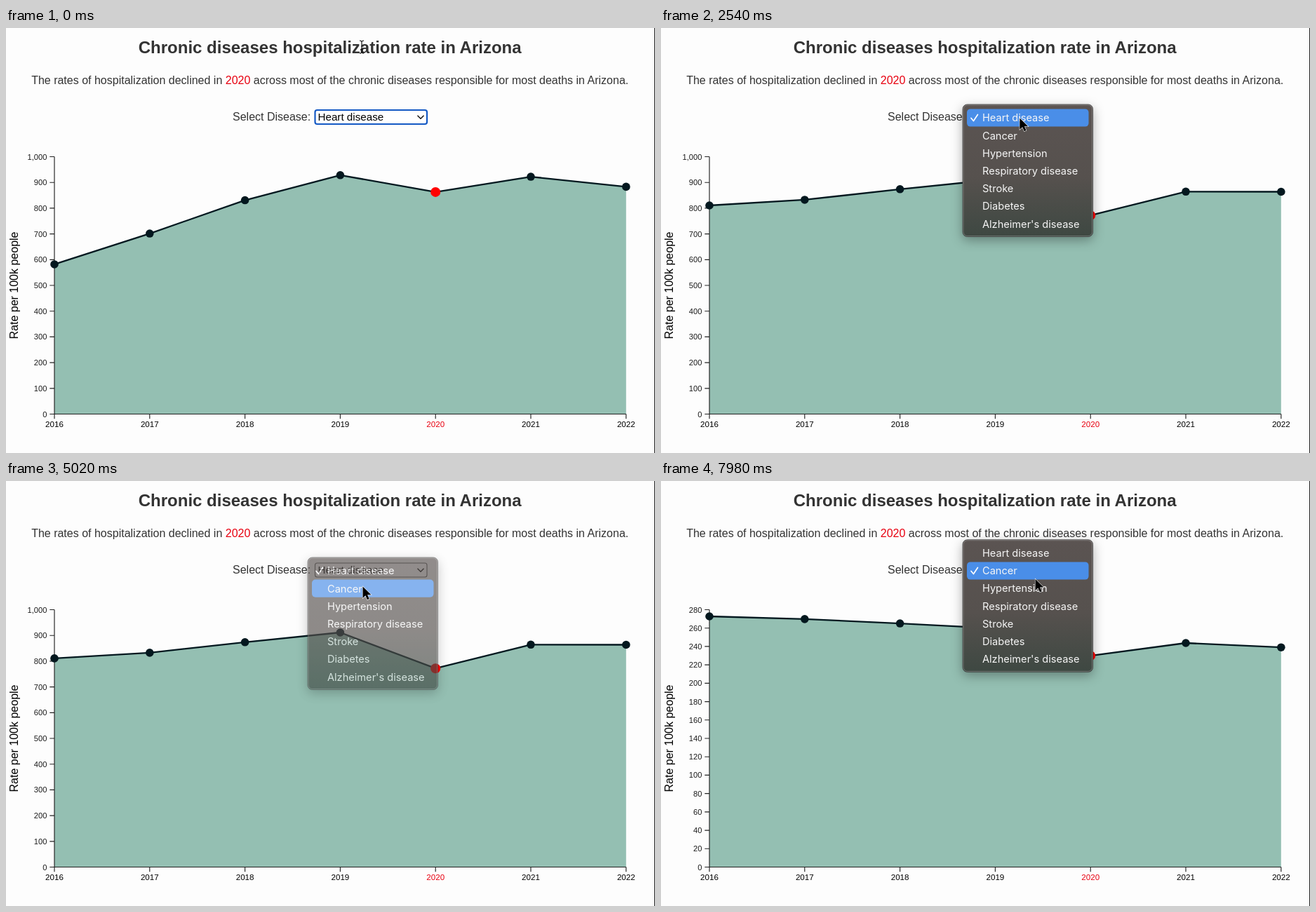
An HTML page that plays this animation: 925 by 606 pixels, repeating every 8000 ms.

```html
<!DOCTYPE html>
<html lang="en">
<head>
<meta charset="utf-8">
<title>Hospitalization rates</title>
<style>
  html, body { margin: 0; width: 100%; height: 100%; overflow: hidden; background: #fdfdfd; }
  svg { display: block; width: 100%; height: 100%; font: 16px "Liberation Sans", Arial, sans-serif; }
  .mid { text-anchor: middle; }
  .axis path { stroke: #222; stroke-width: 1.15; fill: none; }
  .ylab text { font-size: 11.2px; text-anchor: end; fill: #1c1c1c; }
  .xlab text { font-size: 11.6px; text-anchor: middle; }
  #menu { filter: drop-shadow(0 5px 8px rgba(0, 0, 0, .32)); }
  #menu text { font: 14.6px Inter, sans-serif; fill: #f6f6f6; }
</style>
</head>
<body>
<svg viewBox="0 0 925 606">
  <defs>
    <linearGradient id="glass" x2="0" y2="1">
      <stop offset="0" stop-color="#5b5452"/>
      <stop offset=".55" stop-color="#56514e"/>
      <stop offset="1" stop-color="#3e4842"/>
    </linearGradient>
  </defs>
  <rect width="925" height="606" fill="#fdfdfd"/>
  <path d="M924.5 0V606" stroke="#222"/>

  <text class="mid" x="461.7" y="36" font-size="24" font-weight="bold" fill="#333">Chronic diseases hospitalization rate in Arizona</text>
  <text class="mid" x="461.7" y="80" fill="#333">The rates of hospitalization declined in <tspan fill="#e80010">2020</tspan> across most of the chronic diseases responsible for most deaths in Arizona.</text>
  <text x="323" y="132" fill="#333">Select Disease:</text>

  <rect id="box" x="440.5" y="117" width="159.5" height="20" rx="3" fill="#fff"/>
  <text id="choice" x="444.5" y="132" font-size="15.2"></text>
  <path d="M586.5 124.7l4.5 4.6 4.5-4.6" fill="none" stroke="#111" stroke-width="1.4"/>

  <path id="area" fill="#94bfb2"/>
  <g class="axis"><path id="xAxis"/><path id="yAxis"/></g>
  <g id="yLabels" class="ylab"></g>
  <g id="xLabels" class="xlab"></g>
  <text class="mid" transform="translate(16.5 367) rotate(-90)">Rate per 100k people</text>
  <path id="line" fill="none" stroke="#04181f" stroke-width="2.3" stroke-linejoin="round"/>
  <g id="dots"></g>

  <g id="menu">
    <rect x="430" width="185.5" height="188.5" rx="6.5" fill="url(#glass)" stroke="#3a3a3a" stroke-width=".8"/>
    <rect x="430.9" y=".9" width="183.7" height="186.7" rx="5.8" fill="none" stroke="#fff" stroke-opacity=".25"/>
    <rect id="highlight" x="436" width="173.5" height="25.2" rx="5" fill="#4a8ee8"/>
    <g id="items"></g>
    <path id="check" d="M442 .5l3.4 4 6-9" fill="none" stroke="#fff" stroke-width="1.7" stroke-linecap="round" stroke-linejoin="round"/>
  </g>

  <path id="arrow" d="M0 0v16.4l3.8-3.6 2.7 6 2.7-1.2-2.6-5.8h5.3z" fill="#000" stroke="#fff" stroke-width="1.1" paint-order="stroke"/>
  <path id="ibeam" d="M-3-9q3 0 3 2.5V6.5Q0 9-3 9M3-9Q0-9 0-6.5M0 6.5Q0 9 3 9M-2 3.5h4" fill="none" stroke="#111" stroke-width="1.2"/>
</svg>
<script>
const LOOP = 8000, LEFT = 69, STEP = 135.8, TOP = 183.5, BASE = 550.5, ROW = 25.2;
const DURATION = 3000, HEART_START = -265, CANCER_START = 5300;
const FIRST_OPEN = 2250, FADE_START = 4920, FADE_END = 5220, SECOND_OPEN = 6450;

// Heights of the seven points before, between and after the two transitions.
const before = [337.2, 293.2, 245.6, 209.8, 233.8, 212, 226.4];
const heart = [252.9, 244.9, 229.8, 216, 267.2, 233.3, 233.5];
const cancer = [192.7, 196.6, 202.9, 210, 249, 231, 237.2];
const diseases = ["Heart disease", "Cancer", "Hypertension", "Respiratory disease",
  "Stroke", "Diabetes", "Alzheimer's disease"];

// time, x, y of the pointer
const pointerPath = [[0, 507, 27], [1600, 507, 27], [1840, 513.5, 118], [2300, 512, 122],
  [3000, 509.5, 145.5], [3620, 509.5, 146.5], [5020, 508.5, 150.5], [5860, 516, 149],
  [6400, 532, 131], [6860, 533, 132], [7980, 533.5, 139.8], [8000, 533.5, 139.8]];

const $ = id => document.getElementById(id);
const set = (el, attrs) => { for (const k in attrs) el.setAttribute(k, attrs[k]); return el; };
function add(parent, tag, attrs, text = "") {
  const el = set(document.createElementNS("http://www.w3.org/2000/svg", tag), attrs);
  el.textContent = text;
  return parent.appendChild(el);
}
const show = (el, on) => { el.style.display = on ? "" : "none"; };
const clamp = v => Math.min(1, Math.max(0, v));
const mix = (a, b, u) => a + (b - a) * u;
const cubicInOut = u => u < .5 ? 4 * u ** 3 : 1 - 4 * (1 - u) ** 3;
const smooth = u => u * u * (3 - 2 * u);
const xAt = i => LEFT + i * STEP;

let xAxis = `M${LEFT} ${BASE}H${xAt(6)}`;
const dots = heart.map((_, i) => {
  const special = i === 4;
  xAxis += `M${xAt(i)} ${BASE}v6.7`;
  add($("xLabels"), "text", { x: xAt(i), y: 569.4, fill: special ? "#e80010" : "#000" }, 2016 + i);
  return add($("dots"), "circle", { cx: xAt(i), r: special ? 7 : 5.8, fill: special ? "#f00" : "#04181f" });
});
set($("xAxis"), { d: xAxis });
diseases.forEach((name, i) =>
  add($("items"), "text", { x: 458, y: 6.4 + ROW * (i + .5) + 5.3 }, name));

let shownMax;
function drawScale(max, step) {
  if (max === shownMax) return;
  shownMax = max;
  $("yLabels").textContent = "";
  let d = `M${LEFT} ${BASE}V${TOP}`;
  for (let v = 0; v <= max; v += step) {
    const y = mix(BASE, TOP, v / max);
    d += `M${LEFT} ${y}h-6.7`;
    add($("yLabels"), "text", { x: 58.5, y: y + 4 }, v.toLocaleString("en-US"));
  }
  set($("yAxis"), { d });
}

function pointerAt(t) {
  const i = pointerPath.findIndex(p => p[0] > t);
  const a = pointerPath[i - 1], b = pointerPath[i];
  const u = smooth((t - a[0]) / (b[0] - a[0]));
  return [mix(a[1], b[1], u), mix(a[2], b[2], u)];
}

function drawChart(t, isCancer) {
  const [from, to, start] = isCancer ? [heart, cancer, CANCER_START] : [before, heart, HEART_START];
  const u = cubicInOut(clamp((t - start) / DURATION));
  const ys = from.map((y, i) => mix(y, to[i], u));
  const d = "M" + ys.map((y, i) => `${xAt(i)} ${y}`).join("L");
  set($("line"), { d });
  set($("area"), { d: `${d}V${BASE}H${LEFT}Z` });
  dots.forEach((dot, i) => set(dot, { cy: ys[i] }));
  isCancer ? drawScale(280, 20) : drawScale(1000, 100);
}

function drawMenu(t, isCancer, pointerY) {
  const open = t >= FIRST_OPEN && t < FADE_END || t >= SECOND_OPEN;
  show($("menu"), open);
  if (!open) return;
  const selected = isCancer ? 1 : 0;
  const top = 109 - ROW * selected;
  const row = Math.max(0, Math.floor((pointerY - top - 6.4) / ROW));
  set($("menu"), {
    transform: `translate(0 ${top})`,
    opacity: isCancer ? 1 : 1 - clamp((t - FADE_START) / (FADE_END - FADE_START))
  });
  set($("highlight"), { y: 6.4 + ROW * row });
  set($("check"), { transform: `translate(0 ${6.4 + ROW * (selected + .5)})` });
}

function frame(now) {
  const t = now % LOOP;
  const isCancer = t >= CANCER_START;
  const [px, py] = pointerAt(t);
  drawChart(t, isCancer);
  drawMenu(t, isCancer, py);

  const focused = t < FIRST_OPEN || isCancer;
  set($("box"), { stroke: focused ? "#1459c4" : "#555", "stroke-width": focused ? 2.2 : 1.1 });
  $("choice").textContent = diseases[isCancer ? 1 : 0];

  const overText = py < 40 || py > 65 && py < 84;
  show($("ibeam"), overText);
  show($("arrow"), !overText);
  set($(overText ? "ibeam" : "arrow"), { transform: `translate(${px} ${py})` });
  requestAnimationFrame(frame);
}
frame(performance.now());
</script>
</body>
</html>
```
